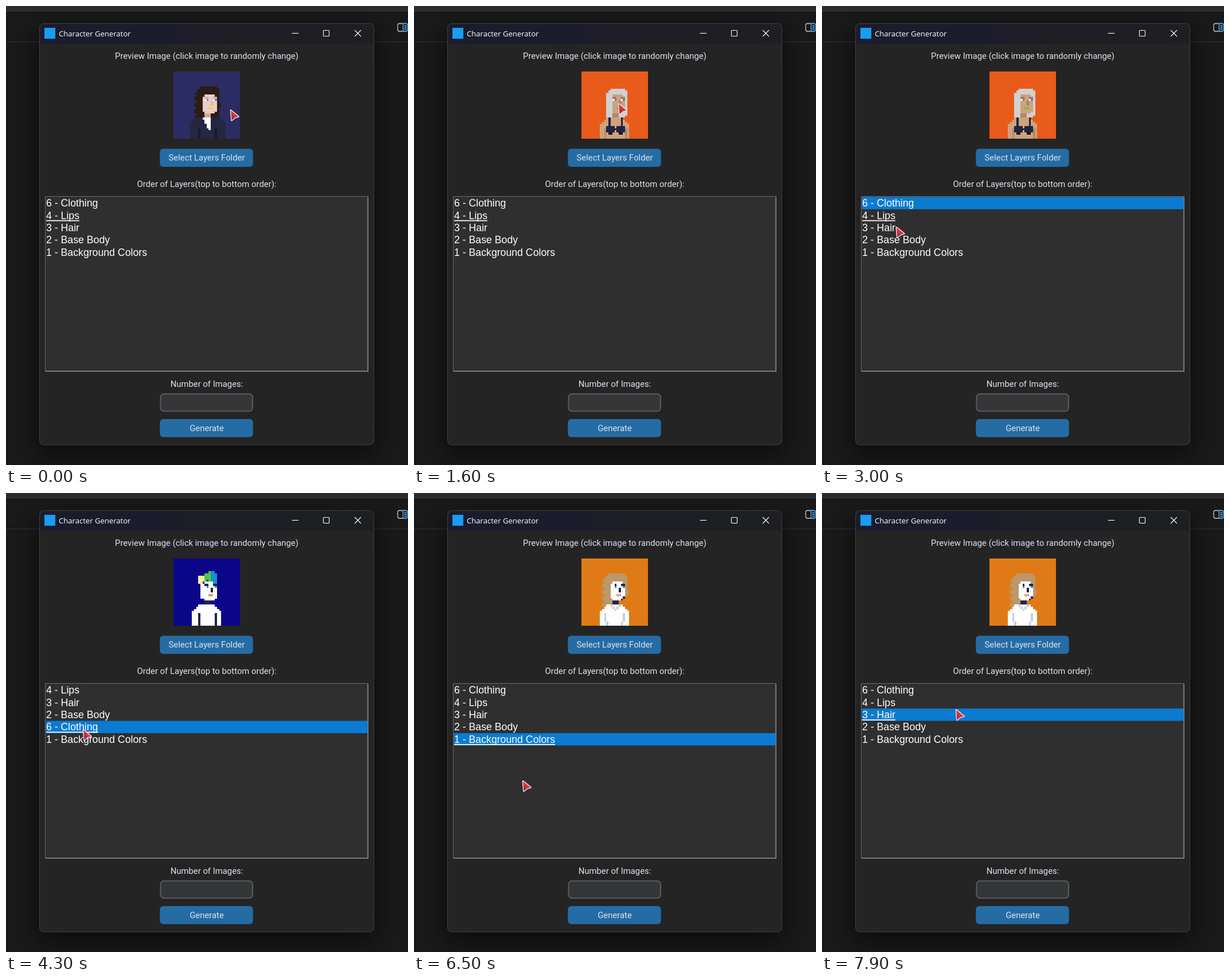
An HTML page with a canvas that plays this animation: 701 by 799 pixels, repeating every 8 s.

```html
<!DOCTYPE html>
<html lang="en">
<head>
<meta charset="utf-8">
<title>Character Generator</title>
<style>
html, body { margin: 0; width: 100%; height: 100%; overflow: hidden; background: #191919; }
canvas { display: block; }
</style>
</head>
<body>
<canvas id="stage" width="701" height="799"></canvas>
<script>
const ctx = document.getElementById('stage').getContext('2d');
const LOOP = 8000;
const ROW = 21.4, LIST_TOP = 332.4;

function rect(color, x, y, w, h) {
  ctx.fillStyle = color;
  ctx.fillRect(x, y, w, h);
}

function round(x, y, w, h, r, fill, stroke, width = 1) {
  ctx.beginPath();
  ctx.roundRect(x, y, w, h, r);
  if (fill) { ctx.fillStyle = fill; ctx.fill(); }
  if (stroke) { ctx.strokeStyle = stroke; ctx.lineWidth = width; ctx.stroke(); }
}

function line(color, x0, y0, x1, y1) {
  ctx.strokeStyle = color;
  ctx.lineWidth = 1.1;
  ctx.beginPath();
  ctx.moveTo(x0, y0);
  ctx.lineTo(x1, y1);
  ctx.stroke();
}

function text(str, x, y, font, color = '#ffffff', align = 'left') {
  ctx.font = font;
  ctx.fillStyle = color;
  ctx.textAlign = align;
  ctx.fillText(str, x, y);
}

const label = (str, y) => text(str, 350, y, '14.85px Roboto, sans-serif', '#dce4ee', 'center');

function button(str, y) {
  round(268.3, y, 162.5, 31.6, 6, '#256ca4');
  label(str, y + 20.5);
}

// Portraits: a 32 x 32 grid of square cells.
const gx = c => Math.round(291.6 + c * 3.64);
const gy = r => Math.round(114.4 + r * 3.64);

function cell(color, c, r, w = 1, h = 1) {
  rect(color, gx(c), gy(r), gx(c + w) - gx(c), gy(r + h) - gy(r));
}

// Fills rows r0..r1; span(r) gives the first and the end column.
function rows(color, r0, r1, span) {
  for (let r = r0; r <= r1; r++) {
    const [a, b] = span(r);
    cell(color, a, r, b - a);
  }
}

function torso(color, spread = 0) {
  rows(color, 22, 31, r => {
    const slope = Math.max(0, 25 - spread - r);
    return [9 - spread + slope, 23 + spread * 2 - slope];
  });
}

function face({ skin, neck, brow, white, nose, lips, left = 14 }) {
  cell(neck, 15, 20, 3, 2);
  rows(skin, 11, 19, r => r % 8 === 3 ? [15, 20] : [left, 21]);
  for (const c of [16, 20]) {
    cell(brow, c - 1, 12, 2);
    cell(white, c - 1, 13);
    cell('#2b8fd0', c, 13);
  }
  cell(nose, 18, 14, 1, 2);
  cell(lips, 17, 17, 2);
}

// Shaggy hair: a rounded crown, then wavy edges; the right side may end sooner.
function longHair(color, rightEnd) {
  rows(color, 7, 22, r => {
    const crown = Math.max(0, 9 - r);
    const left = r < 10 ? 11 : 10 + (r % 3 === 2);
    const right = r > rightEnd ? 15 : 22 + (r === 15 || r === 16);
    return [left + crown, right - (crown >> 1)];
  });
}

function bob(color) {
  rows(color, 8, 22, r => {
    const crown = Math.max(0, 10 - r), taper = Math.max(0, r - 20);
    return [12 + crown + (taper >> 1), 22 - (crown >> 1) - taper];
  });
}

function mohawk(colors) {
  for (let c = 12; c < 21; c++) {
    const top = Math.round(6 + Math.abs(c - 18) * 0.4);
    const end = Math.round(10 + Math.abs(c - 16) * 0.6);
    cell(colors[Math.floor((c - 12) / 3)], c, top, 1, end - top);
  }
}

const portraits = {
  suit() {
    cell('#2c2c64', 0, 0, 32, 32);
    longHair('#2b1c14', 22);
    face({ skin: '#eccdc4', neck: '#cfa899', brow: '#d3b0a6', white: '#ffffff', nose: '#e6b99f', lips: '#e8d178' });
    torso('#25263f', 1);
    rows('#ffffff', 22, 27, r => [14 + ((r - 21) >> 1), 18]);
    for (const c of [12, 20]) cell('#181a2c', c, 27, 1, 5);
  },
  swim() {
    cell('#e85b1a', 0, 0, 32, 32);
    bob('#cfd0d0');
    torso('#cda27c');
    face({ skin: '#cda27c', neck: '#b28968', brow: '#a87b5c', white: '#ffffff', nose: '#ad8060', lips: '#91b050', left: 15 });
    for (const c of [12, 17]) {
      cell('#20233f', c === 12 ? 13 : 19, 22, 1, 4);
      cell('#20233f', c, 26, 4, 3);
      cell('#12152b', c + 1, 29, 2);
      cell('#b28968', c === 12 ? 11 : 21, 27, 1, 5);
    }
    cell('#20233f', 16, 27);
  },
  robot() {
    cell('#0c0689', 0, 0, 32, 32);
    torso('#ffffff');
    face({ skin: '#ffffff', neck: '#20254a', brow: '#20254a', white: '#ffffff', nose: '#20254a', lips: '#df9a83', left: 13 });
    for (const c of [12, 20]) cell('#20254a', c, 26, 1, 6);
    mohawk(['#fbf0a0', '#52c83b', '#168fce']);
  },
  blouse() {
    cell('#df7a16', 0, 0, 32, 32);
    longHair('#ba986c', 17);
    torso('#ffffff');
    face({ skin: '#ffffff', neck: '#20254a', brow: '#20254a', white: '#ffffff', nose: '#20254a', lips: '#e4a097' });
    cell('#ffffff', 15, 12);
    for (const i of [0, 1]) cell('#20254a', 20 - i, 18 + i);
    for (const i of [0, 1, 2]) {
      cell('#c4cde0', 14 + i, 22 + i);
      cell('#c4cde0', 18 - i, 22 + i);
      cell('#c4cde0', 11 + (i >> 1), 26 + i * 2, 1, 2);
      cell('#c4cde0', 20 - (i >> 1), 26 + i * 2, 1, 2);
    }
  }
};

// Cursor tip: time, x, y
const path = [
  [0, 392, 181], [1100, 357, 170], [1800, 357, 170], [2400, 124, 341], [2700, 124, 342],
  [3200, 133, 408], [4400, 135, 412], [5000, 149, 340], [5500, 149, 340],
  [6000, 177, 429], [6500, 190, 501], [7500, 234, 377], [LOOP, 234, 377]
];

function tipAt(t) {
  const i = path.findIndex(p => p[0] > t);
  const [t0, x0, y0] = path[i - 1], [t1, x1, y1] = path[i];
  const u = (t - t0) / (t1 - t0), k = u * u * (3 - 2 * u);
  return [x0 + (x1 - x0) * k, y0 + (y1 - y0) * k];
}

const home = ['6 - Clothing', '4 - Lips', '3 - Hair', '2 - Base Body', '1 - Background Colors'];
const moved = [...home.slice(1, 4), home[0], home[4]];

// Each event updates the running state: active row is underlined, picked row is filled.
const events = [
  { at: 0, look: 'suit', items: home, active: 1, picked: -1 },
  { at: 800, look: 'swim' },
  { at: 2600, picked: 0 },
  { at: 3300, look: 'robot', items: moved, active: 3, picked: -1 },
  { at: 4000, picked: 3 },
  { at: 5100, look: 'blouse', items: home, active: 0, picked: -1 },
  { at: 6000, active: 4, picked: 4 },
  { at: 7500, active: 2, picked: 2 }
];
const stateAt = t => Object.assign({}, ...events.filter(e => e.at <= t));

function backdrop() {
  rect('#191919', 0, 0, 701, 799);
  rect('#2b2b2b', 0, 0, 701, 8);
  rect('#3f3f3f', 0, 8, 701, 1);
  rect('#353535', 0, 62, 701, 1);
  round(683, 30.5, 17, 13.5, 3, null, '#c4c8cc', 1.3);
  round(692.3, 30.5, 8.2, 13.5, [0, 3, 3, 0], '#16303f', '#55a9dc', 1.3);
  for (let y = 34.5; y < 41; y += 3) line('#8cc8ea', 694.5, y, 698.5, y);
}

function frameWindow() {
  ctx.save();
  ctx.shadowColor = 'rgba(0,0,0,0.6)';
  ctx.shadowBlur = 44;
  ctx.shadowOffsetY = 14;
  round(58, 30, 584, 734.5, 8, '#242424');
  ctx.restore();
  const bar = ctx.createLinearGradient(58, 0, 642, 0);
  bar.addColorStop(0, '#1a1c2d');
  bar.addColorStop(0.35, '#1b1c2b');
  bar.addColorStop(0.6, '#1d1e23');
  bar.addColorStop(1, '#1e1f22');
  round(58, 30, 584, 36, [8, 8, 0, 0], bar);
  round(58.5, 30.5, 583, 733.5, 8, null, '#414143');
  rect('#1a9cf2', 67, 38, 19, 19);
  text('Character Generator', 92, 52.5, '13.1px "Open Sans", sans-serif');
  line('#ffffff', 498.5, 47.5, 510, 47.5);
  round(553.5, 42.5, 10, 10, 1, null, '#ffffff', 1.1);
  line('#ffffff', 608, 42, 619, 53);
  line('#ffffff', 619, 42, 608, 53);
}

function listBox({ items, active, picked }) {
  rect('#6b6b6b', 68, 331, 563, 305);
  rect('#a2a2a2', 69, 332, 562.8, 304.3);
  rect('#2f2f2f', 69, 332, 561.5, 303);
  items.forEach((item, i) => {
    const y = LIST_TOP + i * ROW;
    if (i === picked) rect('#0a7bd0', 69.5, y, 561, ROW);
    text(item, 70, y + 16.8, '17.7px "Liberation Sans", Arial, sans-serif');
    if (i === active) rect('#ffffff', 70, y + 19, ctx.measureText(item).width, 1.7);
  });
}

function pointer([x, y]) {
  ctx.save();
  ctx.translate(x, y);
  ctx.beginPath();
  ctx.moveTo(0, 0.5);
  ctx.lineTo(13.5, 11.5);
  ctx.lineTo(7, 13.5);
  ctx.lineTo(1.5, 18);
  ctx.closePath();
  const g = ctx.createLinearGradient(11, 6, 1, 18);
  g.addColorStop(0, '#ee4a33');
  g.addColorStop(0.5, '#c52f42');
  g.addColorStop(1, '#6d2560');
  ctx.fillStyle = g;
  ctx.lineJoin = 'round';
  ctx.strokeStyle = '#f8ecec';
  ctx.lineWidth = 2.6;
  ctx.stroke();
  ctx.fill();
  ctx.restore();
}

function draw(t) {
  const state = stateAt(t);
  backdrop();
  frameWindow();
  label('Preview Image (click image to randomly change)', 92);
  portraits[state.look]();
  button('Select Layers Folder', 248.5);
  label('Order of Layers(top to bottom order):', 314.5);
  listBox(state);
  label('Number of Images:', 663);
  round(269.5, 675.3, 160.5, 30, 6, '#343638', '#565b5e', 2);
  button('Generate', 719);
  pointer(tipAt(t));
}

const start = performance.now();
function tick() {
  const t = (performance.now() - start) % LOOP;
  draw(Math.floor(t / 100) * 100);
  requestAnimationFrame(tick);
}
tick();
</script>
</body>
</html>
```
